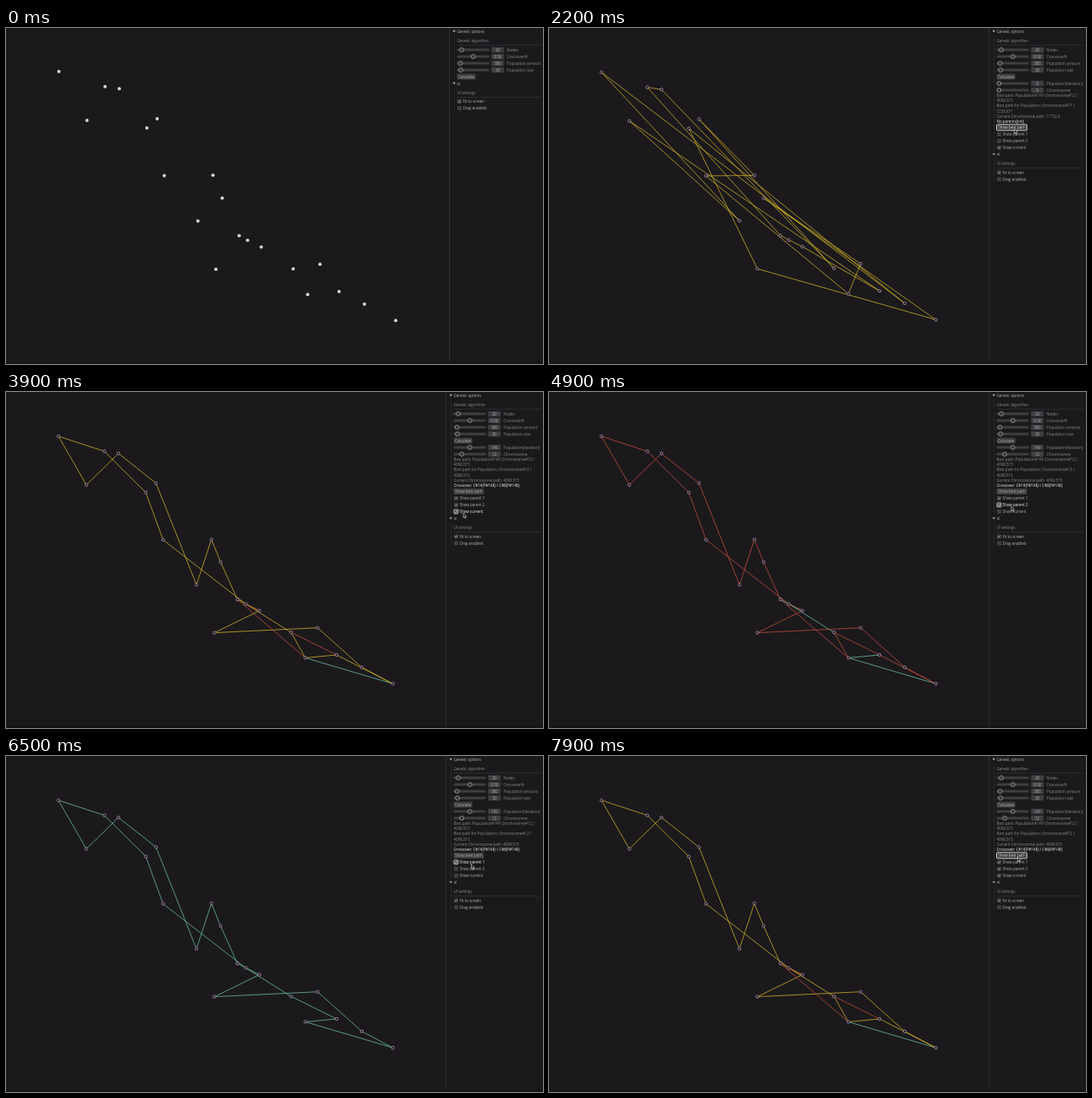
An HTML page for the animation above (8 s loop, 640 px wide and 400 px high).

```html
<!DOCTYPE html>
<html lang="en">
<head>
<meta charset="utf-8">
<title>Genetic path finder</title>
<style>
  html, body { margin: 0; width: 100%; height: 100%; overflow: hidden; background: #1b191c; }
  svg { display: block; width: 640px; height: 400px; }
  text { font: 4.5px "Open Sans", "Noto Sans", sans-serif; fill: #8b8a8d; white-space: pre; }
  .mid { text-anchor: middle; }
  .head { fill: #b4b3b6; }
  .lit { fill: #f4f4f4; }
</style>
</head>
<body>
<svg id="stage" viewBox="0 0 640 400"></svg>
<script>
const LOOP = 8000, STEP = 100, TRAVEL = 600;
const YELLOW = '#cbae28', RED = '#c04d3a', TEAL = '#68ba9a';
const stage = document.getElementById('stage');

// Nodes are listed in the order of the best tour.
const nodes = [
  [62.5, 52.7], [117.2, 70.6], [166.6, 119.6], [187.2, 176], [285.8, 252.4],
  [339.7, 286.2], [356.8, 316.5], [394, 313], [461, 347.3], [424, 327.8],
  [371.4, 280.7], [248.3, 286.6], [302, 260.4], [275.8, 247], [255.8, 202.5],
  [244.8, 175.5], [227, 229.5], [178.8, 108.5], [134, 73.2], [95.8, 110.6]
];

function swapped(tour, i) {
  const out = [...tour];
  [out[i], out[i + 1]] = [out[i + 1], out[i]];
  return out;
}
function reversed(tour, from, to) {
  return [...tour.slice(0, from), ...tour.slice(from, to).reverse(), ...tour.slice(to)];
}
const best = nodes.map((_, i) => i);
const parent1 = swapped(best, 6);
const parent2 = swapped(reversed(best, 5, 13), 11);
const first = [7, 12, 4, 13, 1, 18, 5, 17, 15, 3, 6, 10, 14, 8, 11, 2, 9, 0, 16, 19];

const items = ['best', 'p1', 'p2', 'cur'];
const itemY = key => key === 'calc' ? 58 : 118.4 + 8 * items.indexOf(key);

// Pointer visits: [arrives, clicks, item, x, presses]
const visits = [
  [900, 1300, 'calc', 553, true],
  [2000, 2400, 'best', 554.5, true],
  [2800, 2800, 'p1', 543, true],
  [3600, 3600, 'p2', 544, true],
  [3900, 4100, 'cur', 545, true],
  [4800, 4900, 'p2', 551, false],
  [5200, 5200, 'p1', 546, true],
  [6000, 6000, 'p2', 547, true],
  [6300, 6300, 'p1', 555, true],
  [7000, 7000, 'p2', 548, true],
  [7300, 7500, 'cur', 548, true],
  [7900, 8000, 'best', 558.5, true]
];

function stateAt(t) {
  const s = { calc: false, best: false, p1: false, p2: false, cur: true };
  for (const [, click, item, , press] of visits) {
    if (press && click <= t) s[item] = !s[item];
  }
  s.wide = t >= visits[0][1] + STEP; // the panel grows one step after its new labels
  return s;
}

function pointerAt(t) {
  if (t < 200) return null;
  let x = 8, y = 342, free = 200;
  for (const [arrive, click, item, toX] of visits) {
    const leave = Math.max(free, arrive - TRAVEL);
    const u = Math.min(1, Math.max(0, (t - leave) / (arrive - leave)));
    const k = u * u * (3 - 2 * u);
    x += (toX - x) * k;
    y += (itemY(item) + 1.8 - y) * k;
    free = click;
  }
  return { x, y };
}

const text = (x, y, str, cls = '') => `<text x="${x}" y="${y + 1.6}" class="${cls}">${str}</text>`;
const rect = (x, y, w, h, fill, extra = '') =>
  `<rect x="${x}" y="${y}" width="${w}" height="${h}" fill="${fill}" ${extra}/>`;
const line = (x1, y1, x2, y2, color = '#343337') =>
  `<path d="M${x1} ${y1}L${x2} ${y2}" stroke="${color}" stroke-width=".8"/>`;

function graph(s) {
  const pts = nodes.map(([x, y]) => s.wide ? [x, y] : [x * 1.0075, y * 1.0068 - 1.36]);
  const edges = new Map(); // a later tour recolours the edges it shares
  const add = (tour, color) => tour.forEach((a, i) => {
    const b = tour[(i + 1) % tour.length];
    edges.set(Math.min(a, b) * 100 + Math.max(a, b), [a, b, color]);
  });
  if (s.calc) {
    if (s.p1) add(parent1, TEAL);
    if (s.p2) add(parent2, RED);
    if (s.cur) add(s.best ? best : first, YELLOW);
  }
  const look = s.calc
    ? 'r="1.7" fill="#1f1c20" stroke="#b292b4" stroke-width=".8"'
    : 'r="2" fill="#d6d5d7"';
  return [...edges.values()].map(([a, b, color]) => line(...pts[a], ...pts[b], color)).join('') +
    pts.map(([x, y]) => `<circle cx="${x}" cy="${y}" ${look}/>`).join('');
}

function panel(s, p) {
  const dx = s.wide ? -4 : 0, L = 537.5 + dx, R = 637;
  const over = (y, w) => p && p.x >= L - 1 && p.x <= L + w && Math.abs(p.y - y) <= 4;
  let out = line(528.5 + dx, 0, 528.5 + dx, 398);
  let y = 4;

  // Each part draws itself at y, then moves y down to the next one.
  const title = str => {
    out += `<path d="M${L - 5} ${y - 1.2}h3.2l-1.6 2.6z" fill="#b4b3b6"/>` + text(L, y, str, 'head');
    y += 11;
  };
  const section = str => {
    out += text(L, y + .2, str) + line(L, y + 5.4, R, y + 5.4);
    y += 11;
  };
  const slider = (knob, value, label) => {
    out += rect(L, y - 1.6, 38.3, 3.2, '#3f3e41', 'rx="1.2"') +
      `<circle cx="${L + knob}" cy="${y}" r="2.5" fill="#363538" stroke="#a3a2a5" stroke-width=".75"/>` +
      rect(L + 41, y - 3.2, 15, 6.4, '#3f3e41', 'rx=".8"') +
      text(L + 48.5, y, value, 'mid head') + text(L + 59.5, y, label);
    y += 8;
  };
  const button = (w, str) => {
    const hot = over(y, w);
    out += rect(L, y - 3.5, w, 7, hot ? '#333235' : '#3f3e41',
      `rx=".8" ${hot ? 'stroke="#ececec" stroke-width=".9"' : ''}`) +
      text(L + w / 2, y, str, 'mid ' + (hot ? 'lit' : 'head'));
    y += 8;
  };
  const check = (on, str) => {
    const hot = over(y, 36), ink = hot ? '#f4f4f4' : '#a5a4a7';
    out += rect(L + .4, y - 2.5, 5, 5, '#3f3e41', `rx=".6" ${hot ? `stroke="${ink}" stroke-width=".7"` : ''}`) +
      (on ? `<path d="M${L + 1.5} ${y}l1.1 1.3 1.8-2.7" fill="none" stroke="${ink}" stroke-width=".75"/>` : '') +
      text(L + 7, y, str, hot ? 'lit' : 'head');
    y += 8;
  };
  const note = (str, cls) => {
    out += text(L, y, str, cls);
    y += 6.1;
  };
  const indent = from => { out += line(L - 3, from, L - 3, y - 4.5, '#2d2c30'); };

  title('Genetic options');
  section('Genetic algorithm');
  slider(5.5, '20', 'Nodes');
  slider(19.4, '0.50', 'Crossover%');
  slider(4, '300', 'Population amount');
  slider(4.6, '30', 'Population size');
  button(22.3, 'Calculate');

  if (s.calc) {
    const b = s.best;
    slider(b ? 19.3 : 2.8, b ? '149' : '0', 'Population(Iteration)');
    slider(b ? 9.6 : 2.8, b ? '12' : '0', 'Chromosome');
    y -= 1.4;
    note('Best path: Population#149 Chromosome#12 /');
    note('4098.515');
    note(`Best path for Population: Chromosome#${b ? 12 : 17} /`);
    note(b ? '4098.515' : '7255.871');
    note('Current Chromosome path: ' + (b ? '4098.515' : '11752.6'));
    note(b ? 'Crossover: C#14(P#148) / C#8(P#148)' : 'No parents(init)', 'lit');
    y = itemY('best');
    button(36, 'Show best path');
    check(s.p1, 'Show parent 1');
    check(s.p2, 'Show parent 2');
    check(s.cur, 'Show current');
  }
  indent(9);

  const top = y + 5;
  title('ui');
  section('UI settings');
  y -= .5;
  check(true, 'Fit to screen');
  check(false, 'Drag enabled');
  indent(top);
  return out;
}

function pointer(p) {
  return p ? `<path transform="translate(${p.x} ${p.y})" d="M0 0v5.2l1.2-1 .9 1.9 .9-.4-.9-1.8h1.6z"
    fill="#141316" stroke="#e6e6e6" stroke-width=".6"/>` : '';
}

let last = -1;
function frame(now) {
  const t = Math.floor(now % LOOP / STEP) * STEP;
  if (t !== last) {
    last = t;
    const s = stateAt(t), p = pointerAt(t);
    stage.innerHTML = rect(0, 0, 640, 400, '#1b191c') + rect(0, 398, 640, 2, '#161417') +
      graph(s) + panel(s, p) + pointer(p);
  }
  requestAnimationFrame(frame);
}
frame(performance.now());
</script>
</body>
</html>
```
